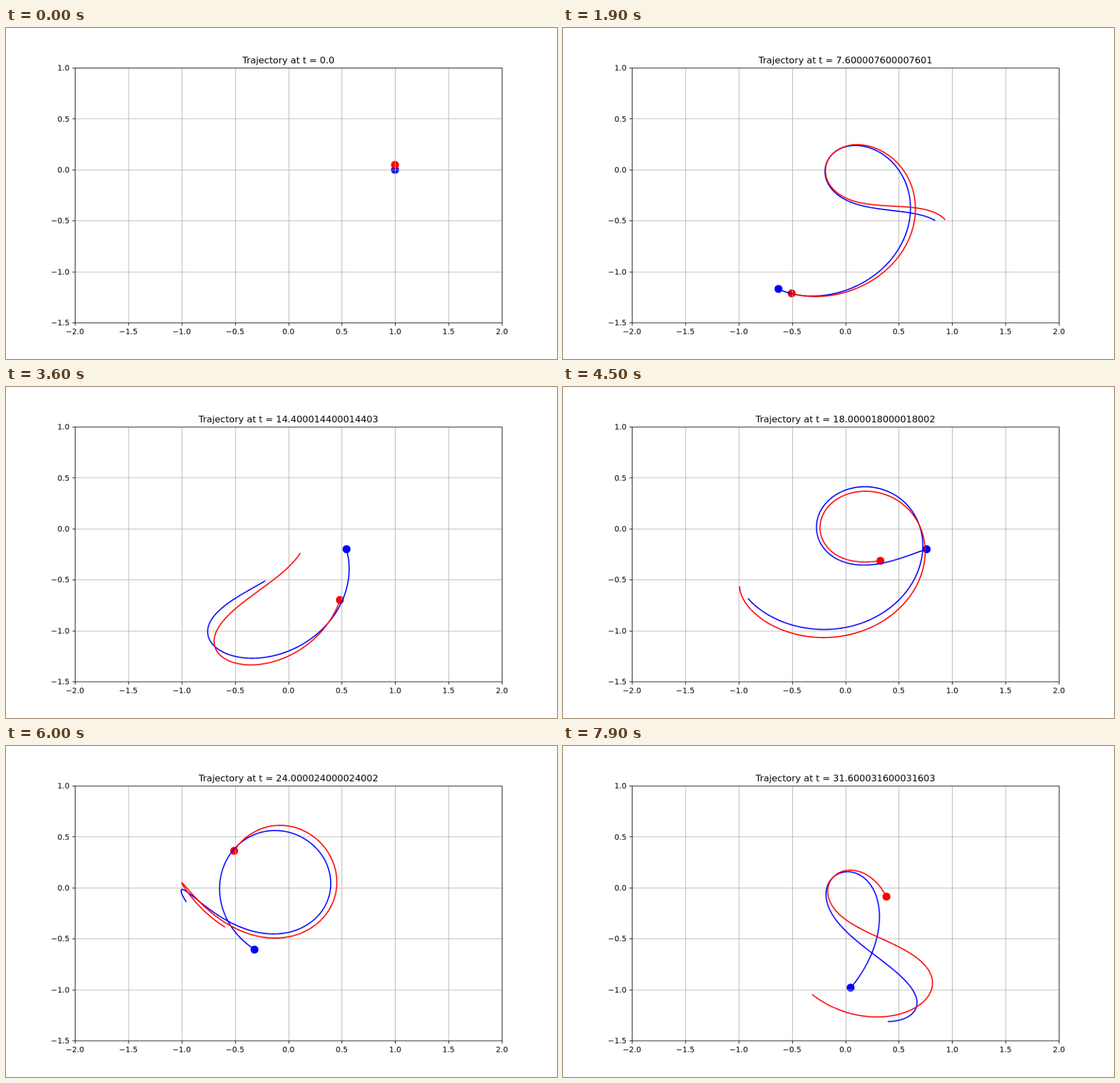
An HTML page with a canvas that plays this animation: 966x580 px, repeating every 8 s.

```html
<!DOCTYPE html>
<html lang="en">
<head>
<meta charset="utf-8">
<title>Swinging mass trajectories</title>
<style>
  html, body { margin: 0; width: 100%; height: 100%; overflow: hidden; background: #fff; }
  canvas { display: block; width: 966px; height: 580px; }
</style>
</head>
<body>
<canvas id="stage" width="966" height="580"></canvas>
<script>
// The plot is drawn at 1000 x 600, then fitted to the stage
const W = 1000, H = 600;
const stage = document.getElementById('stage').getContext('2d');
const plot = document.createElement('canvas');
plot.width = W;
plot.height = H;
const ctx = plot.getContext('2d');

// Timing
const FRAMES = 80, FRAME_MS = 100;
const FRAME_TIME = 0.40000040000040005;
const DT = 0.001, STEPS = 400, TRAIL = 1200;

// Swinging Atwood machine: mass ratio and gravity
const MU = 3, G = 9.81;

// Plot area, sizes in points
const PT = 100 / 72;
const LEFT = 125, RIGHT = 900, TOP = 72, BOTTOM = 534;
const px = x => LEFT + (x + 2) / 4 * (RIGHT - LEFT);
const py = y => TOP + (1 - y) / 2.5 * (BOTTOM - TOP);
const snap = v => Math.floor(v + 0.5) + 0.5;

// State: r, r', angle, angle'
function slope([r, v, a, w]) {
  return [
    v,
    (r * w * w + G * (Math.cos(a) - MU)) / (MU + 1),
    w,
    -(2 * v * w + G * Math.sin(a)) / r
  ];
}

function rk4(s) {
  const add = (k, h) => s.map((v, i) => v + k[i] * h);
  const k1 = slope(s);
  const k2 = slope(add(k1, DT / 2));
  const k3 = slope(add(k2, DT / 2));
  const k4 = slope(add(k3, DT));
  return s.map((v, i) => v + DT / 6 * (k1[i] + 2 * k2[i] + 2 * k3[i] + k4[i]));
}

function simulate(angle) {
  const path = [];
  let s = [1, 0, angle, 0];
  for (let i = 0; i <= (FRAMES - 1) * STEPS; i++) {
    path.push([px(s[0] * Math.sin(s[2])), py(-s[0] * Math.cos(s[2]))]);
    s = rk4(s);
  }
  return path;
}

const bodies = [
  { color: '#0000ff', path: simulate(Math.PI / 2) },
  { color: '#ff0000', path: simulate(Math.PI / 2 + 0.05) }
];

function pen(color, width, cap = 'butt') {
  ctx.strokeStyle = color;
  ctx.lineWidth = width * PT;
  ctx.lineCap = cap;
}

function line(x1, y1, x2, y2) {
  ctx.beginPath();
  ctx.moveTo(x1, y1);
  ctx.lineTo(x2, y2);
  ctx.stroke();
}

function label(text, x, y, size, align) {
  ctx.font = size * PT + 'px "DejaVu Sans", sans-serif';
  ctx.textAlign = align;
  ctx.fillStyle = '#000';
  ctx.fillText(text, x, y);
}

function range(from, to) {
  const out = [];
  for (let v = from; v <= to; v += 0.5) out.push(v);
  return out;
}

const xTicks = range(-2, 2), yTicks = range(-1.5, 1);
const tickText = v => v.toFixed(1).replace('-', '\u2212');

function drawGrid() {
  pen('#b0b0b0', 0.8);
  for (const v of xTicks) line(snap(px(v)), TOP, snap(px(v)), BOTTOM);
  for (const v of yTicks) line(LEFT, snap(py(v)), RIGHT, snap(py(v)));
}

function drawAxes() {
  pen('#000', 0.8);
  for (const v of xTicks) {
    const x = snap(px(v));
    line(x, snap(BOTTOM), x, snap(BOTTOM) + 5);
    label(tickText(v), px(v), 555, 10, 'center');
  }
  for (const v of yTicks) {
    const y = snap(py(v));
    line(snap(LEFT), y, snap(LEFT) - 5, y);
    label(tickText(v), LEFT - 7 * PT, Math.round(py(v) + 5.2), 10, 'right');
  }
  ctx.strokeRect(snap(LEFT), snap(TOP), RIGHT - LEFT, BOTTOM - TOP);
}

function drawMarker({ color, path }, i) {
  ctx.fillStyle = color;
  ctx.beginPath();
  ctx.arc(Math.round(path[i][0]), Math.round(path[i][1]), 7.25, 0, Math.PI * 2);
  ctx.fill();
}

function drawTrail({ color, path }, i) {
  if (!i) return;
  pen(color, 1.5, 'square');
  ctx.lineJoin = 'round';
  ctx.beginPath();
  for (let j = Math.max(0, i - TRAIL); j <= i; j += 2) ctx.lineTo(...path[j]);
  ctx.stroke();
}

function draw(frame) {
  const i = frame * STEPS;
  ctx.fillStyle = '#fff';
  ctx.fillRect(0, 0, W, H);
  bodies.forEach(b => drawMarker(b, i));
  drawGrid();
  bodies.forEach(b => drawTrail(b, i));
  drawAxes();
  const time = frame ? String(frame * FRAME_TIME) : '0.0';
  label('Trajectory at t = ' + time, (LEFT + RIGHT) / 2, 64, 12, 'center');
  stage.drawImage(plot, 0, 0, 966, 580);
}

let start = null, shown = -1;
function tick(now) {
  if (start === null) start = now;
  const frame = Math.floor((now - start) / FRAME_MS) % FRAMES;
  if (frame !== shown) draw(shown = frame);
  requestAnimationFrame(tick);
}
draw(0);
requestAnimationFrame(tick);
</script>
</body>
</html>
```
